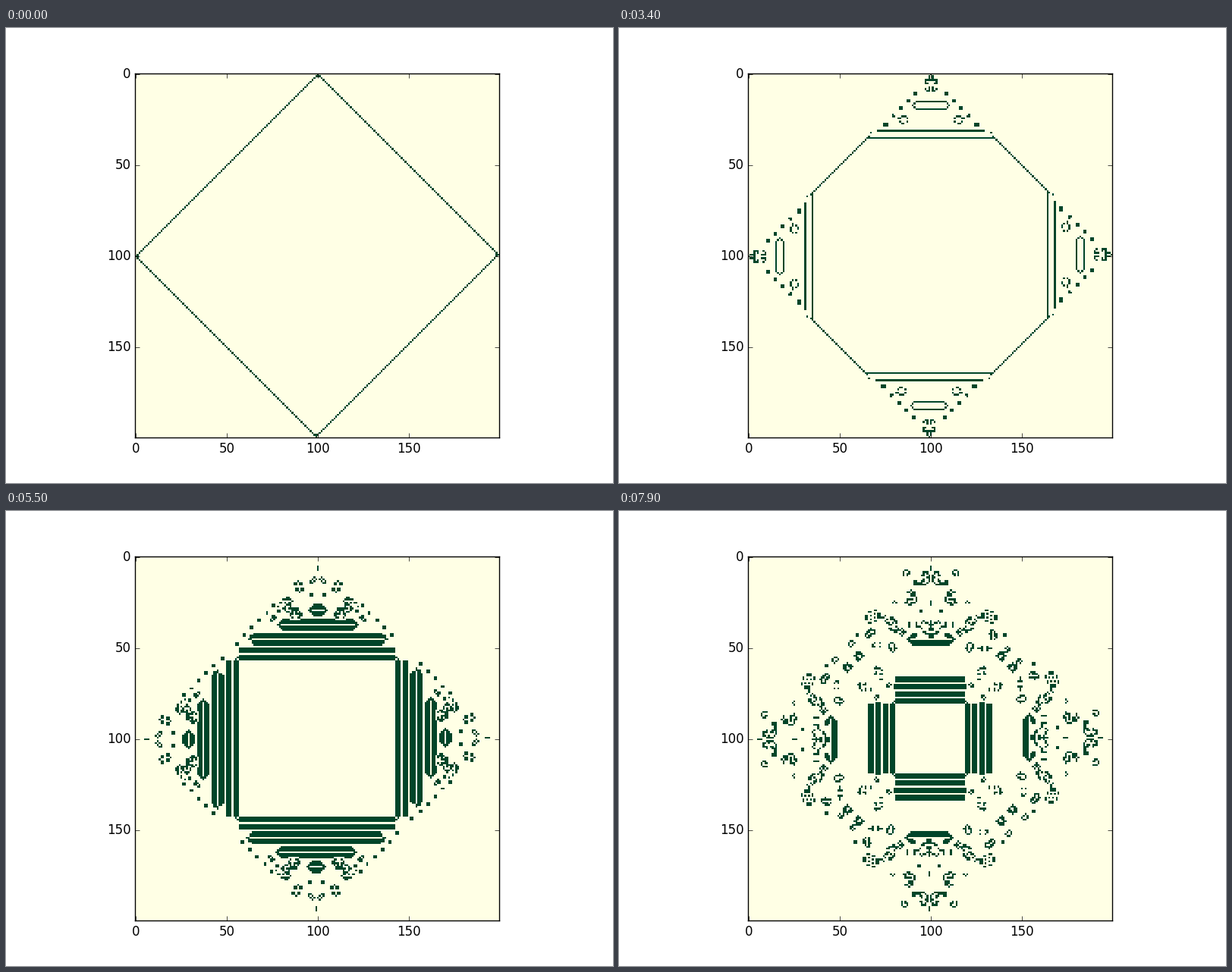
A matplotlib script that plays this animation: 800 px wide and 600 px high, repeating every 8000 ms.

```python
import numpy as np
import matplotlib.pyplot as plt
from matplotlib.animation import FuncAnimation

N = 200
FRAMES = 80
STEP_MS = 100


def diamond(n):
    """Four diagonals joining the middles of the grid's sides."""
    row, col = np.indices((n, n))
    half = n // 2
    edges = (row + col == half) | (abs(row - col) == half)
    return (edges | (row + col == 3 * half - 2)).astype(int)


def evolve(grid):
    """One step of the Game of Life; cells beyond the border are dead."""
    n = len(grid)
    p = np.pad(grid, 1)
    near = sum(p[r:r + n, c:c + n] for r in range(3) for c in range(3)) - grid
    return ((near == 3) | ((grid == 1) & (near == 2))).astype(int)


def generations(count):
    grid = diamond(N)
    for _ in range(count):
        grid = evolve(grid)
        yield grid


plt.style.use("classic")
plt.rcParams.update({
    "font.family": "DejaVu Sans",
    "font.size": 12,
    "figure.facecolor": "white",
    "savefig.facecolor": "white",
})

history = list(generations(FRAMES))

fig, ax = plt.subplots(figsize=(8, 6), dpi=100)
image = ax.imshow(history[0], cmap="YlGn", vmin=0, vmax=1,
                  interpolation="nearest")
ax.set_xticks(range(0, N, 50))
ax.set_yticks(range(0, N, 50))


def update(i):
    image.set_data(history[i])
    return image,


anim = FuncAnimation(fig, update, frames=FRAMES, interval=STEP_MS, repeat=True)
plt.show()
```
